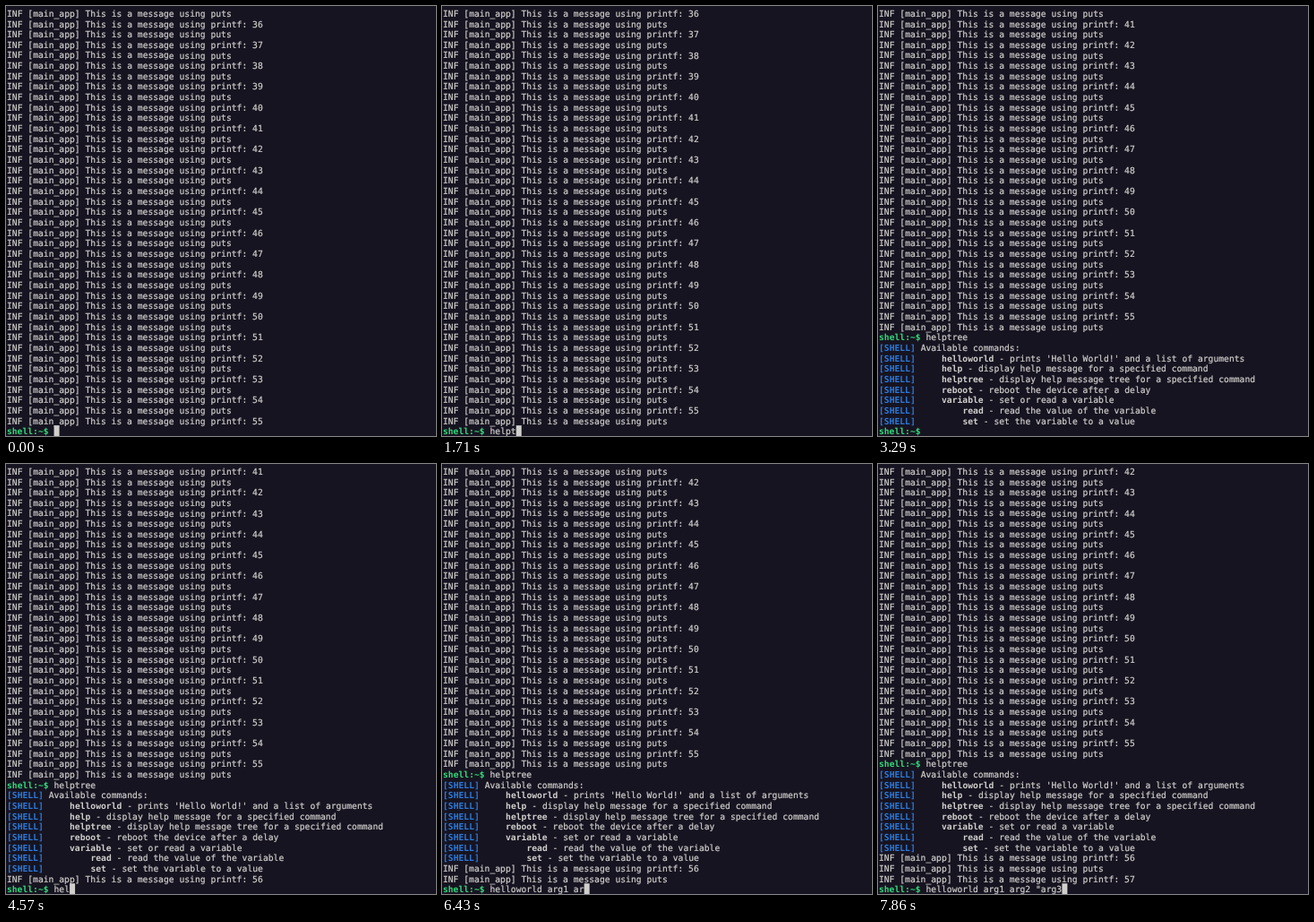
Recreate the animation shown at these times as an HTML page. Size 480 by 480 pixels, loop 8000 ms.

```html
<!DOCTYPE html>
<html lang="en">
<head>
<meta charset="utf-8">
<title>Shell session</title>
<style>
  html, body { margin: 0; width: 100%; height: 100%; overflow: hidden; background: #171421; }
  svg { display: block; width: 100vw; height: 100vh; }
  text {
    font: 9.7px "DejaVu Sans Mono", monospace; white-space: pre; text-rendering: geometricPrecision;
    fill: #d0cfcc; stroke: #d0cfcc; stroke-width: 0.2px;
  }
  .bold, .prompt, .tag { font-weight: bold; stroke: none; }
  .prompt { fill: #33da7a; }
  .tag { fill: #2a7bde; }
</style>
</head>
<body>
<svg viewBox="0 0 480 480" xmlns="http://www.w3.org/2000/svg">
  <!-- The imperceptible turn keeps baselines from snapping to whole pixels. -->
  <g id="screen" transform="rotate(0.005)"></g>
  <rect id="cursor" y="468.2" width="6" height="12" fill="#d0cfcc"/>
</svg>
<script>
const LOOP = 8000, ROWS = 41;
const LEFT = 1, CELL = 5.84, LINE = 11.66, BASELINE = 11.85;
const NS = "http://www.w3.org/2000/svg";
const screenGroup = document.getElementById("screen");
const cursor = document.getElementById("cursor");

// A line is a list of [text, class] runs.
const log = message => [["INF [main_app] This is a message using " + message, ""]];
const puts = () => log("puts");
const printf = n => log("printf: " + n);
const prompt = input => [["shell:~$", "prompt"], [" " + input, ""]];
const shell = (indent, name, rest) =>
  [["[SHELL]", "tag"], [" ".repeat(indent), ""], [name, "bold"], [rest, ""]];

const history = [];
for (let n = 36; n <= 55; n++) history.push(puts(), printf(n));

const help = [
  prompt("helptree"),
  shell(1, "", "Available commands:"),
  shell(5, "helloworld", " - prints 'Hello World!' and a list of arguments"),
  shell(5, "help", " - display help message for a specified command"),
  shell(5, "helptree", " - display help message tree for a specified command"),
  shell(5, "reboot", " - reboot the device after a delay"),
  shell(5, "variable", " - set or read a variable"),
  shell(9, "read", " - read the value of the variable"),
  shell(9, "set", " - set the variable to a value"),
];

const outputs = [
  [1430, [puts()]],
  [2430, help],
  [4430, [printf(56)]],
  [5000, [puts()]],
  [7140, [printf(57)]],
];

// Times at which the input line takes a new value.
const inputs = [[0, ""]];
const type = (text, times) => {
  let value = inputs[inputs.length - 1][1];
  times.forEach((time, i) => inputs.push([time, value += text[i]]));
};
type("helptr", [1000, 1290, 1430, 1570, 1710, 1860]);
inputs.push([2000, "helptree "], [2430, ""]);
type("hello", [4290, 4430, 4570, 4710, 4860]);
inputs.push([5140, "helloworld "]);
type("arg1 ar", [5570, 5710, 5860, 6000, 6140, 6290, 6430]);
type('g2 "arg3', [6710, 6860, 7000, 7290, 7430, 7570, 7710, 7860]);

const cursorOff = [[430, 1000], [3000, 3570]];

const rows = Array.from({ length: ROWS }, (_, i) => {
  const row = document.createElementNS(NS, "text");
  row.setAttribute("y", BASELINE + i * LINE);
  return screenGroup.appendChild(row);
});

function drawLine(row, runs) {
  let column = 0;
  row.replaceChildren(...runs.filter(([text]) => text).map(([text, style]) => {
    const span = document.createElementNS(NS, "tspan");
    span.setAttribute("x", LEFT + column * CELL);
    span.setAttribute("class", style);
    span.textContent = text;
    column += text.length;
    return span;
  }));
}

let shown = "";
function draw(t) {
  const past = outputs.filter(([time]) => time <= t);
  const input = inputs.filter(([time]) => time <= t).pop()[1];
  const key = past.length + ":" + input;
  if (key !== shown) {
    shown = key;
    const lines = [...history, ...past.flatMap(([, added]) => added), prompt(input)].slice(-ROWS);
    rows.forEach((row, i) => drawLine(row, lines[i]));
    cursor.setAttribute("x", LEFT + (9 + input.length) * CELL);
  }
  const hidden = cursorOff.some(([from, to]) => t >= from && t < to);
  cursor.setAttribute("visibility", hidden ? "hidden" : "visible");
}

const start = performance.now();
function tick() {
  draw((performance.now() - start) % LOOP);
  requestAnimationFrame(tick);
}
tick();
</script>
</body>
</html>
```
